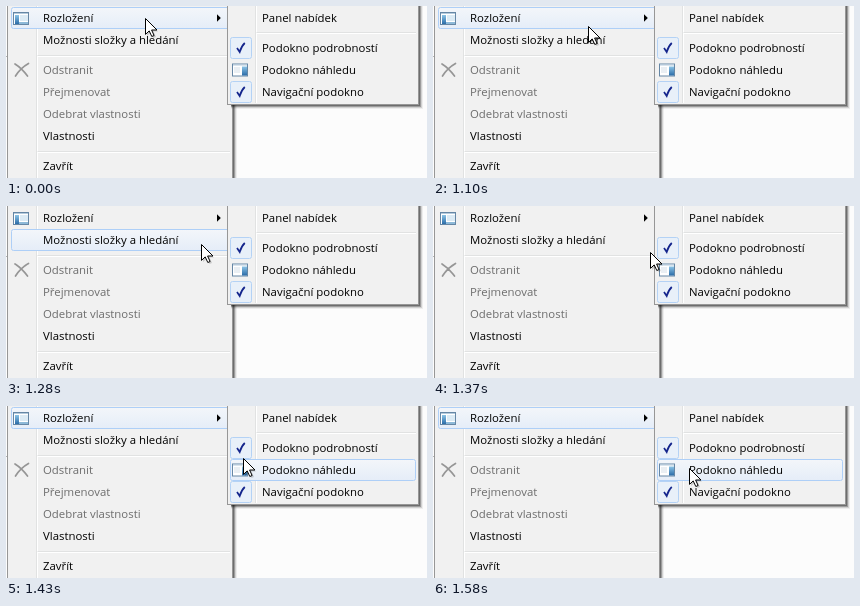
Animation, 421 px wide and 172 px high, one loop 2500 ms. Source, as an HTML page:

```html
<!DOCTYPE html>
<html lang="cs">
<meta charset="utf-8">
<title>Menu</title>
<style>
  html, body { margin: 0; width: 100%; height: 100%; overflow: hidden; background: #fcfcfc; }
  svg { display: block; }
  text { font: 11.4px "Open Sans", "Noto Sans", sans-serif; fill: #000; }
  .off { fill: #6d6d6d; }
  .frame { fill: #f1f1f1; stroke: #979797; }
  .dark { stroke: #e1e2e2; }
  .light { stroke: #fff; }
  .hot { fill: url(#glow); stroke: #aecff7; }
  .cell { fill: #e8f0f9; stroke: #b4d2f5; }
  .tick { fill: none; stroke: #14258c; stroke-width: 1.7; }
</style>
<svg width="421" height="172" viewBox="0 0 421 172">
  <defs>
    <linearGradient id="glow" x2="0" y2="1">
      <stop stop-color="#f3f6fa"/><stop offset="1" stop-color="#e5edf8"/>
    </linearGradient>
    <linearGradient id="pane" x2="0" y2="1">
      <stop stop-color="#8cc4e6"/><stop offset="1" stop-color="#2b6ca8"/>
    </linearGradient>
    <g id="window">
      <rect x=".5" y=".5" width="15" height="12" fill="#fff" stroke="#6687a5"/>
      <path d="M1 1.5H15" stroke="#b4cadc"/>
    </g>
  </defs>
  <path d="M0 50.5H1" stroke="#b5b5b5"/>
  <g id="mainFrame"></g>
  <g id="main"></g>
  <path d="M211 8.3L214.8 12L211 15.7Z"/>
  <g transform="translate(7 6)">
    <use href="#window"/>
    <rect x="2" y="3" width="4" height="9" fill="url(#pane)"/>
    <rect x="7" y="3" width="8" height="6" fill="#dcebf5"/>
    <rect x="6" y="10" width="9" height="2" fill="#8db9d8"/>
  </g>
  <path d="M9 58Q15.5 62 21.5 70M22.5 57.5Q14.5 62 9.5 70" fill="none" stroke="#969696" stroke-width="1.7" stroke-linecap="round"/>
  <g id="subFrame"></g>
  <g id="sub"></g>
  <g transform="translate(226 57.5)">
    <use href="#window"/>
    <rect x="10" y="3" width="5" height="9" fill="url(#pane)"/>
    <path d="M2 4.5H8M2 6.5H8M2 8.5H8" stroke="#d5dfe8"/>
  </g>
  <g id="cursor">
    <path d="M2 2V18L6 14.5L8.5 20L11 19L8.5 13.5H13Z" opacity=".16"/>
    <path d="M.5 .5V16.4L4.2 12.9L6.8 18.5L9.1 17.5L6.6 12H12Z" fill="#fff" stroke="#000"/>
  </g>
</svg>
<script>
const STEP = 30, LOOP = 2500, START = 950;
// Pointer path: [step, x, y]
const path = [[0, 139, 12], [1, 142, 12], [5, 155, 20], [8, 173, 30],
  [14, 217, 46], [16, 237, 52.4], [18, 249, 57], [21, 256, 62]];
const shadow = [.06, .12, .25, .3];

const byId = id => document.getElementById(id);
const line = (cls, d) => `<path class="${cls}" d="${d}"/>`;
const row = (cls, x, y, w) =>
  `<rect class="${cls}" x="${x + .5}" y="${y + .5}" width="${w - 1}" height="21" rx="2"/>`;

function buildFrame(id, x, right, bottom) {
  const shades = shadow.map((alpha, i) => {
    const grow = shadow.length - i;
    return `<rect x="${x + 4}" y="-9" width="${right - x - 4 + grow}" height="${bottom + 9 + grow}" opacity="${alpha}"/>`;
  });
  byId(id).innerHTML = shades.join('') +
    `<rect class="frame" x="${x + .5}" y="-9.5" width="${right - x - 1}" height="${bottom + 9}"/>`;
}

function buildMenu(id, left, right, bottom, items, rules) {
  const gutter = left + 29.5;
  let out = line('dark', `M${gutter} 0V${bottom}`) + line('light', `M${gutter + 1} 0V${bottom}`);
  for (const y of rules)
    out += line('dark', `M${gutter + 1} ${y - .5}H${right}`) +
      line('light', `M${gutter + 1} ${y + .5}H${right}`);
  for (const [label, y, kind] of items) {
    out += `<g class="item">${row('hot', left + 4, y, right - left - 4)}</g>`;
    if (kind === 'checked')
      out += row('cell', left + 4, y, 22) +
        line('tick', `M${left + 11} ${y + 11}L${left + 13.7} ${y + 15}Q${left + 15.5} ${y + 9} ${left + 18.8} ${y + 6}`);
    out += `<text class="${kind || ''}" x="${left + 36}" y="${y + 15}">${label}</text>`;
  }
  byId(id).innerHTML = out;
  const glows = [...byId(id).querySelectorAll('.item')];
  return hit => items.forEach(([, y], i) =>
    glows[i].setAttribute('visibility', hit >= y && hit < y + 22 ? 'visible' : 'hidden'));
}

buildFrame('mainFrame', 1, 227, 190);
buildFrame('subFrame', 221, 413, 99);
const lightMain = buildMenu('main', 1, 224, 172, [
  ['Rozložení', 1], ['Možnosti složky a hledání', 23],
  ['Odstranit', 53, 'off'], ['Přejmenovat', 75, 'off'],
  ['Odebrat vlastnosti', 97, 'off'], ['Vlastnosti', 119], ['Zavřít', 149]
], [50, 146]);
const lightSub = buildMenu('sub', 220, 410, 97, [
  ['Panel nabídek', 1], ['Podokno podrobností', 31, 'checked'],
  ['Podokno náhledu', 53], ['Navigační podokno', 75, 'checked']
], [27]);

function pointer(step) {
  const i = Math.max(1, path.findIndex(p => p[0] >= step));
  const [s0, x0, y0] = path[i - 1], [s1, x1, y1] = path[i];
  const k = (step - s0) / (s1 - s0);
  return [x0 + (x1 - x0) * k, y0 + (y1 - y0) * k].map(Math.round);
}

function draw(now) {
  const step = Math.floor((now % LOOP - START) / STEP);
  const [x, y] = pointer(Math.min(21, Math.max(0, step)));
  const inSub = x >= 222;
  lightMain(inSub ? 12 : y);
  lightSub(inSub ? y + 1 : -1);
  byId('cursor').setAttribute('transform', `translate(${x} ${y})`);
  requestAnimationFrame(() => draw(performance.now()));
}
draw(performance.now());
</script>
</html>
```
